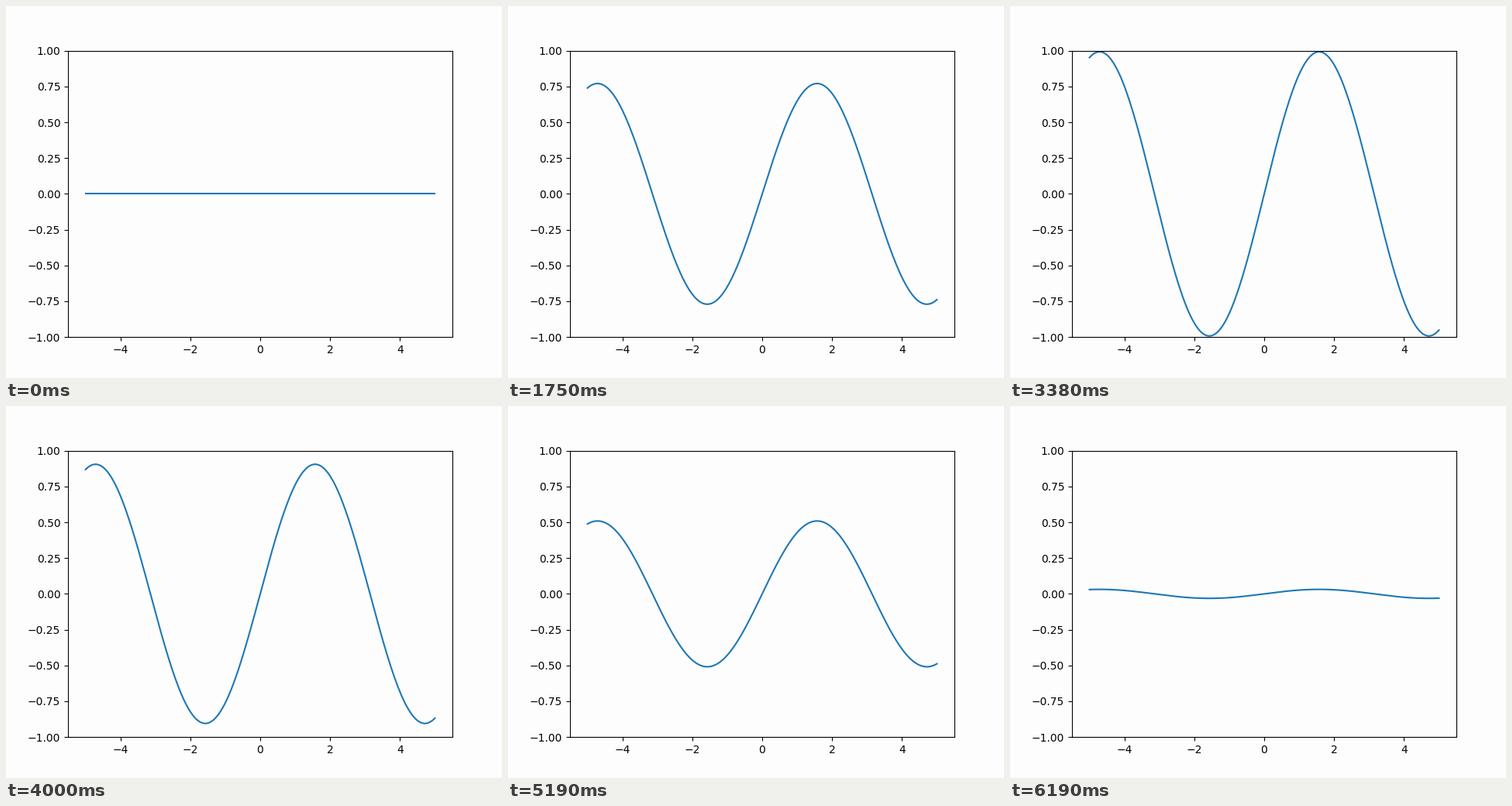
Recreate the animation shown at these times as a matplotlib script. Size 640 by 480 pixels, loop 6.25 s.

```python
import numpy as np
import matplotlib.pyplot as plt
from matplotlib.animation import FuncAnimation

FRAMES = 100
LOOP_MS = 6250
PAPER = "#fdfdfe"

fig, ax = plt.subplots(figsize=(6.4, 4.8), dpi=100, facecolor=PAPER)
ax.set_facecolor(PAPER)
ax.set_xlim(-5.5, 5.5)
ax.set_ylim(-1, 1)

x = np.linspace(-5, 5, 200)
wave = np.sin(x)
line, = ax.plot(x, 0 * x, color="#1f77b4", lw=1.5)


def update(i):
    # The amplitude swells and fades along half a sine period.
    line.set_ydata(np.sin(np.pi * i / FRAMES) * wave)
    return line,


anim = FuncAnimation(fig, update, frames=FRAMES, interval=LOOP_MS / FRAMES,
                     init_func=lambda: update(0), repeat=True, repeat_delay=0)
plt.show()
```
